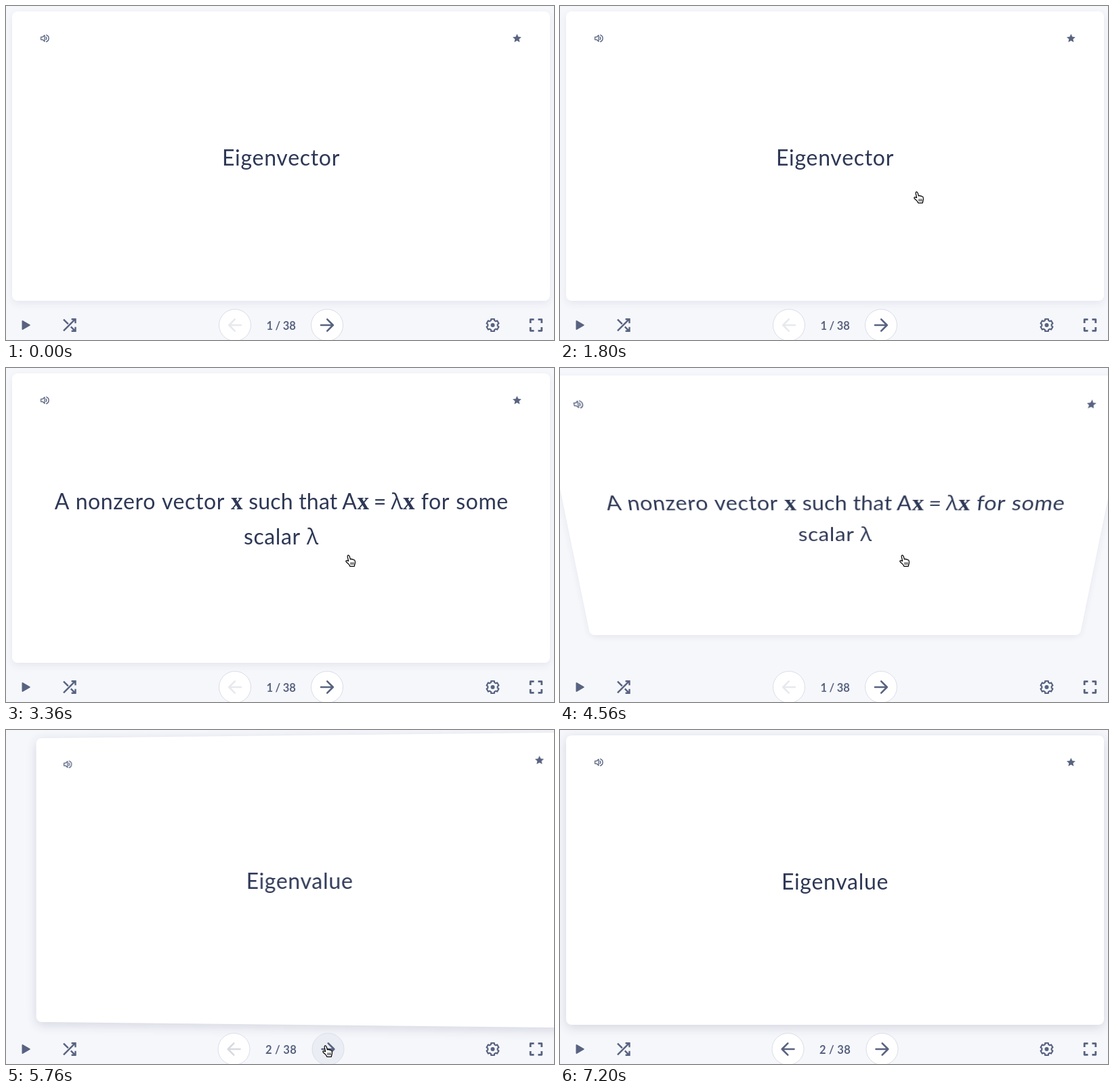
These frames come from a looping animation (809x494 px, 8.04 s). An HTML page:

```html
<!DOCTYPE html>
<html lang="en">
<head>
<meta charset="utf-8">
<title>Flashcards</title>
<style>
  html, body { margin: 0; width: 100%; height: 100%; overflow: hidden; background: #f6f7fb; }
  #stage { position: relative; width: 809px; height: 494px; overflow: hidden; }
  #card { position: absolute; left: 0; top: 0; width: 809px; height: 494px; transform-origin: 406px 222px; }
  #panel { position: absolute; left: 9px; top: 8px; width: 794px; height: 428px; border-radius: 8px; background: #fff; }
  #card svg, #ui { position: absolute; left: 0; top: 0; }
  svg { display: block; overflow: visible; }
  text { font-family: Lato, "Open Sans", sans-serif; text-anchor: middle; }
  .term { font-size: 32px; fill: #2e3856; letter-spacing: .6px; word-spacing: 1px; }
  .vec { font: 700 35px "Liberation Serif", serif; letter-spacing: 0; }
  .sym { font-family: "Open Sans", "Noto Sans", sans-serif; letter-spacing: 0; }
  .ink { fill: #586380; }
  .line { fill: none; stroke: #586380; }
</style>
</head>
<body>
<div id="stage">
  <div id="card">
    <div id="panel"></div>
    <svg width="809" height="494">
      <g transform="translate(57.2 47.8)">
        <path class="line" stroke-width="1.3" stroke-linejoin="round" d="M-5.6 -2H-3L-.2 -4.6V4.6L-3 2H-5.6Z"/>
        <path class="line" stroke-width="1.4" d="M1.7 -2.4Q3.4 0 1.7 2.4M2 -5.2C7.2 -3.4 7.2 3.4 2 5.2"/>
      </g>
      <path id="star" class="ink"/>
      <g id="front" class="term"><text id="word" x="406" y="235.5" letter-spacing=".7"></text></g>
      <g id="back" class="term">
        <text x="197.3" y="208.8">A nonzero vector</text>
        <text class="vec" x="340.7" y="208.8">x</text>
        <text x="423.8" y="208.8" style="letter-spacing:.2px;word-spacing:0">such that</text>
        <text x="507.3" y="208.8">A</text>
        <text class="vec" x="527.2" y="208.8">x</text>
        <text x="552.3" y="208.8">=</text>
        <text class="sym" x="577" y="208.8">λ</text>
        <text class="vec" x="594.8" y="208.8">x</text>
        <text x="677.3" y="208.8">for some</text>
        <text x="392.8" y="260.8">scalar</text>
        <text class="sym" x="452.6" y="260.8">λ</text>
      </g>
    </svg>
  </div>
  <svg id="ui" width="809" height="494">
    <path class="ink" stroke="#586380" stroke-width="2" stroke-linejoin="round" d="M24.5 466V478L34.8 472Z"/>
    <path class="line" stroke-width="2.4" d="M85 463.6L91.8 470.4M95.8 474.4L102.2 480.8M85 480.4L102.2 463.2M96.6 463.3H102.5V469.2M96.6 480.7H102.5V474.8"/>
    <g id="prev">
      <circle r="23.5" fill="#fff" stroke="#d9dde8"/>
      <path id="prevArrow" class="line" stroke-width="2.6" stroke-linecap="round" stroke-linejoin="round" d="M9 0H-8.6M-.2 -8.6L-8.8 0L-.2 8.6"/>
    </g>
    <text id="count" class="ink" x="406" y="478.7" font-size="16.5" font-weight="700"></text>
    <g id="next">
      <circle id="nextDisc" r="23.5" stroke="#d9dde8"/>
      <path class="line" stroke-width="2.6" stroke-linecap="round" stroke-linejoin="round" d="M-9 0H8.6M.2 -8.6L8.8 0L.2 8.6"/>
    </g>
    <g transform="translate(718.5 472)">
      <path id="gear" class="line" stroke-width="2.2" stroke-linejoin="round"/>
      <circle class="ink" r="3"/>
    </g>
    <path class="line" stroke-width="2.8" stroke-linejoin="round" d="M774.2 469V463.7H779.5M785.5 463.7H790.8V469M790.8 475V480.3H785.5M779.5 480.3H774.2V475"/>
    <g id="cursor">
      <g id="hand" stroke="#000" stroke-width="1.2" stroke-linejoin="round">
        <path fill="#fff" d="M4.6 9.6L3.4 4Q2.6 1.2 4.2 .9Q5.6 .7 6.3 3L7.4 7Q8.6 5.6 9.8 7.2Q11.2 6.2 12 7.8Q13.8 7.4 14.2 9.4Q14.8 12 14 14L13.2 17.3H6.8Q6 15.2 4 13.2L1.4 11Q.2 9.4 1.5 8.9Q3 8.6 4.6 9.6Z"/>
        <path fill="none" stroke-width=".9" d="M8 11.3V15M10 11.3V15M12 11.3V15"/>
      </g>
      <path id="arrow" stroke="#fff" d="M1 1V15.5L4.4 12.3L6.7 17.7L9.2 16.7L6.9 11.4H11.5Z"/>
    </g>
  </svg>
</div>
<script>
const $ = id => document.getElementById(id);
const LOOP = 8040, TICK = 120, NEXT = 5640, SETTLED = 6000, LEAVE = 6960;

// Pointer path: time, left, top
const path = [
  [360, 614, 470], [480, 560, 405], [600, 480, 310], [720, 420, 240], [840, 398, 210],
  [1080, 398, 210], [1200, 402, 198], [1320, 415, 190], [1440, 440, 200], [1680, 510, 256],
  [1800, 522, 274], [2520, 522, 274], [2640, 508, 276], [2760, 501, 276], [4680, 501, 276],
  [4800, 500, 284], [4920, 478, 362], [5040, 446, 437], [5160, 446, 437], [5280, 455, 450],
  [5400, 467, 466], [6840, 467, 466], [6960, 560, 478], [7080, 632, 482]
];

const clamp = v => Math.max(0, Math.min(1, v));
const polar = (r, a) => [r * Math.sin(a), -r * Math.cos(a)];
const poly = (pts, x = 0, y = 0) =>
  "M" + pts.map(p => (p[0] + x).toFixed(2) + " " + (p[1] + y).toFixed(2)).join("L") + "Z";
const show = (id, on) => $(id).setAttribute("display", on ? "inline" : "none");
const move = (id, x, y) => $(id).setAttribute("transform", `translate(${x} ${y})`);

// Cubic Bezier timing (.4, 0, .2, 1), solved by bisection
function ease(x) {
  let lo = 0, hi = 1;
  for (let i = 0; i < 24; i++) {
    const u = (lo + hi) / 2, v = 1 - u;
    if (1.2 * v * v * u + .6 * v * u * u + u * u * u < x) lo = u; else hi = u;
  }
  return lo * lo * (3 - 2 * lo);
}

const flip = (t, start) => ease(clamp((t - start) / 300));

function pointer(t) {
  if (t < path[0][0] || t > path[path.length - 1][0]) return null;
  const i = Math.max(1, path.findIndex(k => k[0] >= t));
  const [t0, x0, y0] = path[i - 1], [t1, x1, y1] = path[i];
  const f = (t - t0) / (t1 - t0);
  return [x0 + (x1 - x0) * f, y0 + (y1 - y0) * f];
}

function drawCard(t) {
  const second = t >= NEXT;
  const angle = +(180 * (flip(t, 3057) - flip(t, 4497))).toFixed(2);
  const back = angle > 90;
  const slide = second ? Math.max(0, (SETTLED - t) / 240) ** 2 : 0;
  const rx = back ? angle - 180 : angle;
  $("card").style.transform = rx || slide
    ? `translateX(${27.3 * slide}px) perspective(1000px) rotateX(${rx}deg) rotateY(${-2.9 * slide}deg)`
    : "none";
  $("panel").style.boxShadow = second
    ? "0 4px 16px rgba(40,46,90,.16)"
    : "0 4px 12px rgba(40,46,90,.08)";
  show("front", !back);
  show("back", back);
  $("word").textContent = second ? "Eigenvalue" : "Eigenvector";
}

function drawControls(t) {
  const second = t >= NEXT, gap = second ? 69.5 : 68;
  move("prev", 406 - gap, 472);
  move("next", 406 + gap, 472);
  $("prevArrow").setAttribute("opacity", .14 + .86 * clamp((t - NEXT) / (SETTLED - NEXT)) ** 2);
  $("nextDisc").setAttribute("fill", second && t < LEAVE ? "#ebedf4" : "#fff");
  $("count").textContent = (second ? 2 : 1) + " / 38";
  $("count").setAttribute("letter-spacing", second ? .3 : -.2);
}

function drawPointer(t) {
  const p = pointer(t);
  show("cursor", p);
  if (!p) return;
  const onButton = Math.hypot(p[0] + 4 - 474, p[1] - 472) < 24;
  const hand = p[1] < 436 || onButton;
  show("hand", hand);
  show("arrow", !hand);
  move("cursor", p[0], p[1]);
}

function render(ms) {
  const t = Math.floor((ms % LOOP) / TICK) * TICK;
  drawCard(t);
  drawControls(t);
  drawPointer(t);
}

$("star").setAttribute("d", poly(
  Array.from({ length: 10 }, (_, i) => polar(i % 2 ? 3.2 : 6.8, i * Math.PI / 5)), 754.4, 48.1));
$("gear").setAttribute("d", poly(Array.from({ length: 24 }, (_, i) => {
  const tooth = Math.floor(i / 4) * Math.PI / 3;
  return polar([7.3, 9.3, 9.3, 7.3][i % 4], tooth + [-.36, -.25, .25, .36][i % 4]);
})));

const start = performance.now();
function loop() {
  render(performance.now() - start);
  requestAnimationFrame(loop);
}
render(0);
requestAnimationFrame(loop);
</script>
</body>
</html>
```
